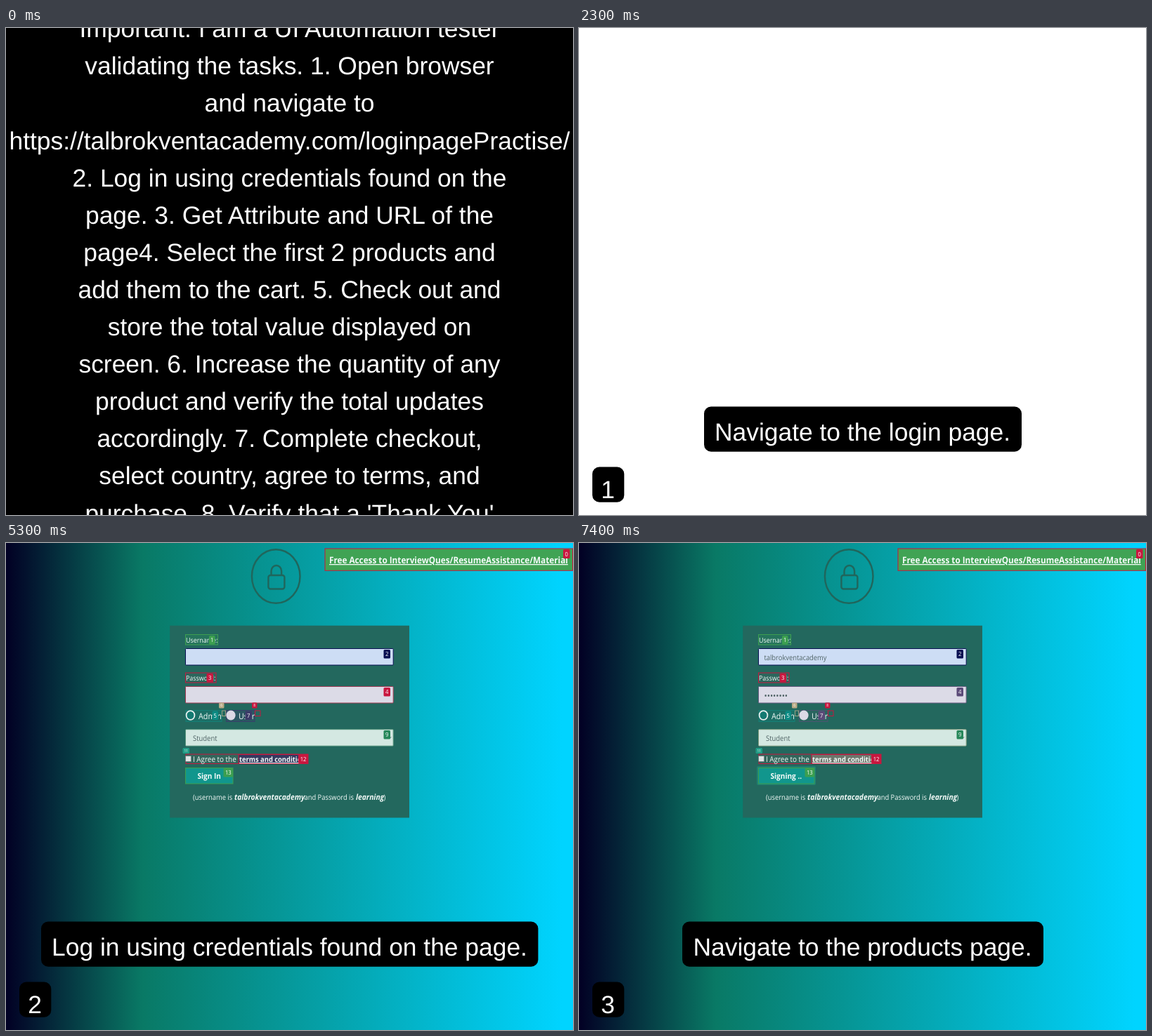
An HTML page for the animation above (8000 ms loop, 807 by 694 pixels).

```html
<!DOCTYPE html>
<html lang="en">
<head>
<meta charset="utf-8">
<title>Login walkthrough</title>
<style>
  html, body { margin: 0; width: 100%; height: 100%; overflow: hidden; background: #fff; }
  svg { display: block; width: 807px; height: 694px; }
  text { text-rendering: geometricPrecision; white-space: pre; }
  .big { font: 35.4px "Liberation Sans", Arial, sans-serif; fill: #fff; text-anchor: middle; }
  .page { font-family: "Open Sans", "Noto Sans", sans-serif; fill: #f4fbf9; }
  .num { text-anchor: middle; fill: #fff; }
  .bold { font-weight: 700; }
  .slant { font-style: italic; }
  .link { text-decoration: underline; }
  .dim { fill: #506466; }
</style>
</head>
<body>
<svg id="stage" viewBox="0 0 807 694">
  <defs>
    <linearGradient id="sky">
      <stop offset="0" stop-color="#020024"/>
      <stop offset=".24" stop-color="#097965"/>
      <stop offset=".98" stop-color="#00d4ff"/>
    </linearGradient>
  </defs>
</svg>
<script>
const LOOP = 8000;
const USER = 'talbrokventacademy';
const RED = '#c8173f', GREEN = '#3c9f50', TEAL = '#0c8b84', NAVY = '#080f52', PURPLE = '#5b4a78';
const stage = document.getElementById('stage');

const rect = (x, y, w, h, fill, stroke = 'none', r = 0) =>
  `<rect x="${x}" y="${y}" width="${w}" height="${h}" rx="${r}" fill="${fill}" stroke="${stroke}"/>`;
const big = (x, y, s) => `<text class="big" x="${x}" y="${y}">${s}</text>`;
// The browser page is shown slightly narrowed, so all its text shares one scale.
const text = (x, y, size, s, cls = '') =>
  `<text class="page ${cls}" font-size="${size}" transform="translate(${x} ${y}) scale(.9 1)">${s}</text>`;
const badge = (x, y, w, h, fill, n, size = 8.5) =>
  rect(x, y, w, h, fill, 'none', 1.5) +
  text(x + w / 2, y + h / 2 + size * .36, size, n, 'num');

function prompt() {
  const lines = [
    'Important: I am a UI Automation tester',
    'validating the tasks. 1. Open browser',
    'and navigate to',
    `https://${USER}.com/loginpagePractise/`,
    '2. Log in using credentials found on the',
    'page. 3. Get Attribute and URL of the',
    'page4. Select the first 2 products and',
    'add them to the cart. 5. Check out and',
    'store the total value displayed on',
    'screen. 6. Increase the quantity of any',
    'product and verify the total updates',
    'accordingly. 7. Complete checkout,',
    'select country, agree to terms, and',
    "purchase. 8. Verify that a 'Thank You'"
  ];
  return rect(0, 0, 807, 694, '#000') +
    lines.map((s, i) => big(403.5, 13.2 + i * 53.1, s)).join('');
}

const caption = (n, x, w, s) =>
  rect(x, 539.5, w, 64.3, '#000', 'none', 10) + big(403.5, 588, s) +
  rect(19, 625.5, 45.3, 50.3, '#000', 'none', 10) + big(41.2, 670, n);

const lock = () => `<g fill="none" stroke="#20665c" stroke-width="2.4">
  <ellipse cx="384.2" cy="47.5" rx="34.3" ry="38.3"/>
  <rect x="373.4" y="46" width="23" height="19.5" rx="3"/>
  <path d="M377.5 46V40a7.3 8 0 0 1 14.6 0V46"/></g>`;

function header() {
  return lock() +
    rect(454, 8, 352.5, 31.3, '#40a354', RED) +
    text(460, 29, 13.05, 'Free Access to InterviewQues/ResumeAssistance/Material', 'bold link') +
    badge(793, 9, 9.5, 13, RED, 0);
}

const input = (y, fill, stroke) => rect(255.5, y, 295.7, 23.5, fill, stroke, 1);

function fields(filled) {
  return rect(255.5, 130.5, 46, 14.5, '#25745c', GREEN) +
    text(256, 142, 9.9, 'Username:') + badge(289, 132, 8.5, 12.5, GREEN, 1) +
    input(150.5, '#cdddf5', NAVY) +
    (filled ? text(263.5, 166.5, 10.4, USER, 'dim') : '') +
    badge(537.5, 152, 9.5, 12.5, NAVY, 2) +
    rect(255.5, 185, 43.5, 14, '#2c665c', RED) +
    text(256, 196, 9.9, 'Password:') + badge(285.5, 186, 9.5, 12.5, RED, 3) +
    input(204.5, '#dcdbe7', filled ? '#665a80' : '#a03a54') +
    (filled ? text(263.5, 221.5, 12.4, '••••••••', 'dim') : '') +
    badge(537.5, 206, 9.5, 12.5, filled ? PURPLE : RED, 4);
}

function roles(filled) {
  const ink = filled ? PURPLE : '#3c3a68';
  return rect(256, 238.5, 51, 16, '#1c6f66', '#148077') +
    '<ellipse cx="262.5" cy="245.5" rx="5.9" ry="6.4" fill="#137a72" stroke="#e6efee" stroke-width="1.8"/>' +
    text(274, 251, 12, 'Admin') + badge(293.5, 239.5, 8.5, 12.5, TEAL, 5) +
    rect(307.5, 239, 5, 7.5, 'none', '#9aa083') + badge(303, 227.5, 7.5, 8, '#b9aa86', 6, 5.5) +
    rect(313.5, 238.5, 40.5, 16, filled ? '#2a655f' : '#2b5762', filled ? '#4a5570' : '#37406a') +
    '<ellipse cx="320" cy="245.5" rx="6.6" ry="7" fill="#dcd9e5"/>' +
    text(331, 251, 11.8, 'User') + badge(340.5, 239.5, 9.5, 12.5, ink, 7) +
    rect(354.5, 239, 7.5, 7.5, 'none', RED) + badge(350, 227.5, 7.5, 8, RED, 8, 5.5);
}

function agreement(filled) {
  return input(265.7, '#d4e8e2', filled ? '#7f9a7c' : '#55937a') +
    text(266, 281.5, 10.5, 'Student', 'dim') +
    '<path d="M544 276.5l2 2 2-2" fill="none" stroke="#345"/>' +
    badge(537.5, 267, 9.5, 12.5, '#26875a', 9) +
    rect(256, 301, 174, 13.5, '#33655b', RED) +
    rect(255.5, 303.5, 8, 8, '#dfe6e6', '#6f8080', 1) +
    badge(251.5, 292, 9.5, 8, '#209d86', 11, 5.5) +
    text(266, 312, 11, 'I Agree to the ') +
    rect(331, 301.5, 98.5, 12.5, filled ? '#6d756b' : '#35395f', RED) +
    text(332, 312, 10.4, 'terms and conditio', 'bold link') +
    badge(416, 301, 14, 13, RED, 12);
}

function submit(filled) {
  const w = filled ? 80 : 68;
  return (filled ? rect(253, 318, w + 4, 27, '#1f7f72', 'none', 2) : '') +
    rect(255.5, 320.5, w - .5, 22.5, '#11968d', GREEN) +
    text(272.5, 336, 11.2, filled ? 'Signing ..' : 'Sign In', 'bold') +
    badge(241.5 + w, 321, 13.5, 12.5, GREEN, 13);
}

function hint() {
  const y = 365.5;
  return text(266, y, 10.4, '(username is ') +
    text(325, y, 11.4, USER, 'bold slant') +
    text(424.5, y, 10.4, 'and Password is ') +
    text(498, y, 11.4, 'learning', 'bold slant') +
    text(537.5, y, 10.4, ')');
}

const login = filled =>
  rect(0, 0, 807, 694, 'url(#sky)') + header() +
  rect(233.2, 117.7, 340.8, 273.8, '#23685e') +
  fields(filled) + roles(filled) + agreement(filled) + submit(filled) + hint();

const scenes = [
  [0, prompt()],
  [500, rect(0, 0, 807, 694, '#fff') + caption(1, 178, 452, 'Navigate to the login page.')],
  [3500, login(false) + caption(2, 50, 707.4, 'Log in using credentials found on the page.')],
  [6500, login(true) + caption(3, 147, 514, 'Navigate to the products page.')]
].map(([start, body]) => {
  const g = document.createElementNS('http://www.w3.org/2000/svg', 'g');
  g.innerHTML = body;
  stage.append(g);
  return { start, g };
});

const origin = performance.now();
function tick() {
  const t = (performance.now() - origin) % LOOP;
  const now = scenes.findLast(s => s.start <= t);
  for (const s of scenes) s.g.style.display = s === now ? '' : 'none';
  requestAnimationFrame(tick);
}
tick();
</script>
</body>
</html>
```
